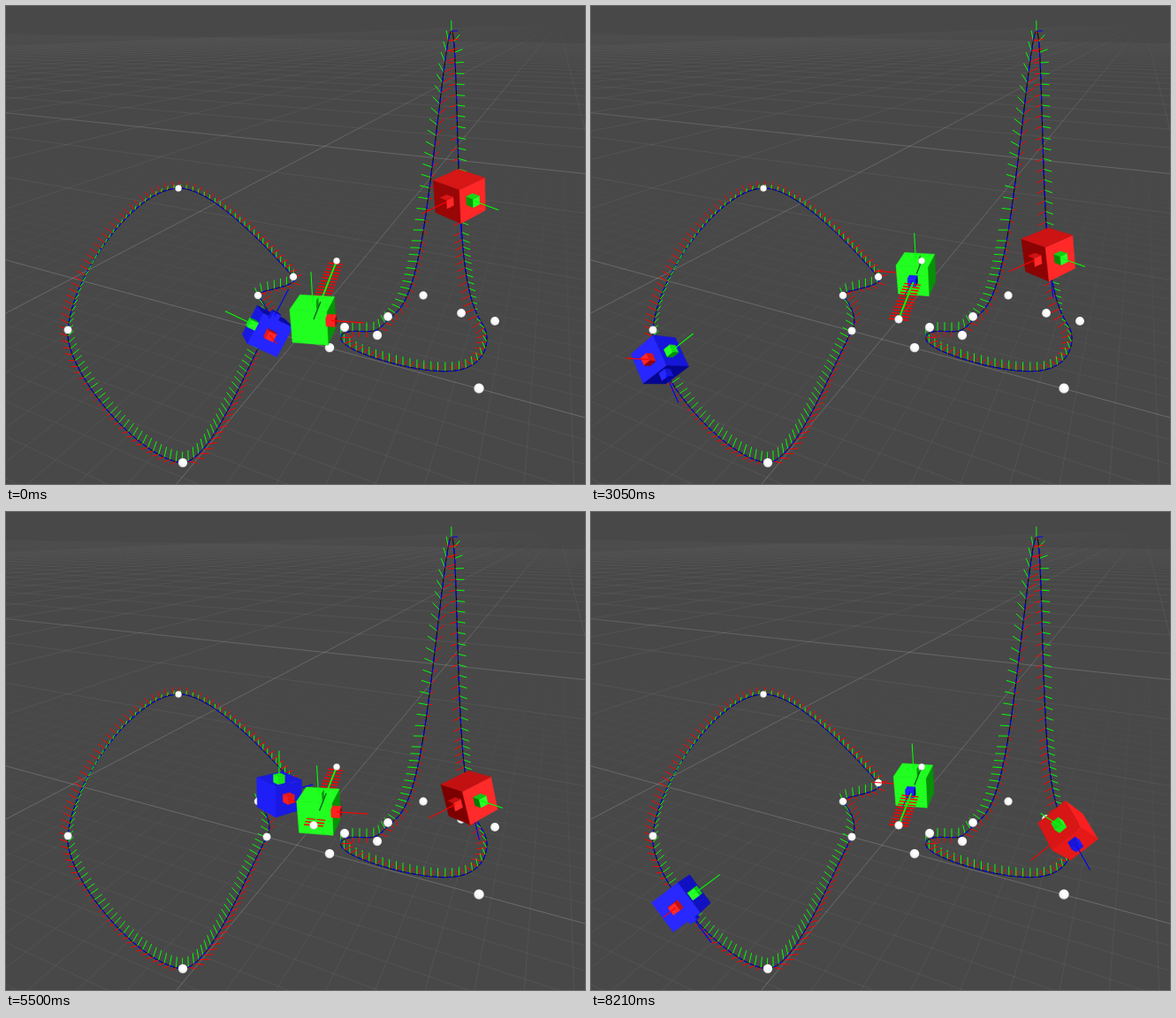
An HTML page with a canvas that plays this animation: 655 px wide and 540 px high, repeating every 8260 ms.

```html
<!DOCTYPE html>
<html lang="en">
<head>
<meta charset="utf-8">
<title>Cubes on splines</title>
<style>
html, body { margin: 0; width: 100%; height: 100%; overflow: hidden; background: #484848; }
canvas { display: block; }
</style>
</head>
<body>
<canvas id="stage" width="655" height="540"></canvas>
<script>
const W = 655, H = 540, LOOP = 8260, LAP = 4927;
const RED = '#f00', GREEN = '#0f0', BLUE = '#00f';
const view = document.getElementById('stage').getContext('2d');

// Vectors: x right, y down, z towards the viewer.
const dot = (a, b) => a[0] * b[0] + a[1] * b[1] + a[2] * b[2];
const mul = (a, k) => a.map(v => v * k);
const add = (a, b) => a.map((v, i) => v + b[i]);
const mix = (a, b, k) => a.map((v, i) => v + (b[i] - v) * k);
const unit = a => mul(a, 1 / Math.hypot(...a));
const cross = (a, b) => [
  a[1] * b[2] - a[2] * b[1],
  a[2] * b[0] - a[0] * b[2],
  a[0] * b[1] - a[1] * b[0]
];

// Left loop: Bezier pieces as node, handle, handle.
const knots = [
  [295, 367], [303, 352], [292, 336],
  [285, 327], [281, 321], [334, 318],
  [325, 306], [307, 286], [235, 204],
  [195, 206], [148, 206], [76, 300],
  [70, 366], [66, 412], [150, 512],
  [200, 516], [232, 512], [265, 425]
];
// Right loop: closed uniform B-spline.
const hull = [[511, -126], [509, 347], [553, 356], [535, 432], [366, 386],
  [383, 363], [420, 372], [432, 351], [472, 327]];

const blend = (pts, from, weights) => [0, 1].map(c =>
  weights.reduce((sum, w, j) => sum + w * pts[(from + j) % pts.length][c], 0));

function bezier(u) {
  const i = Math.floor(u), t = u - i, s = 1 - t;
  return blend(knots, i * 3, [s ** 3, 3 * s * s * t, 3 * s * t * t, t ** 3]);
}

function bspline(u) {
  const i = Math.floor(u), t = u - i, s = 1 - t;
  const bump = x => (3 * x ** 3 - 6 * x * x + 4) / 6;
  return blend(hull, i + hull.length - 1, [s ** 3 / 6, bump(t), bump(s), t ** 3 / 6]);
}

// A track leans by its key up vectors; the rest follows from its direction.
const loop = {
  path: bezier, count: 6, gap: () => 7.2, size: p => 12.2 + .018 * p[1],
  ups: [
    [0, [-.9, -.42, .3]],
    [1.5, [0, -.93, .35]],
    [2.7, [.04, -.53, .84]],
    [3.4, [.1, -.4, .9]],
    [4.4, [.75, -.52, .42]],
    [5, [.03, -.95, .3]],
    [6, [-.9, -.42, .3]]
  ]
};
const tower = {
  path: bspline, count: 9, gap: p => p[1] < 260 ? 12 : 8, size: () => 20.3,
  ups: [
    [0, [0, -1, .2]],
    [.3, [.8, 0, .6]],
    [.8, [.72, .27, .64]],
    [1.3, [.6, .2, .76]],
    [1.8, [-.5, -.3, .8]],
    [3, [0, -.85, .53]],
    [6, [0, -.85, .53]],
    [8, [-.95, 0, .35]],
    [9, [0, -1, .2]]
  ]
};

function frameAt(track, u) {
  const p = track.path(u), q = track.path(u + .002);
  const i = Math.max(1, track.ups.findIndex(k => k[0] >= u));
  const [a, b] = [track.ups[i - 1], track.ups[i]];
  const up = unit(mix(a[1], b[1], (u - a[0]) / (b[0] - a[0])));
  const dx = q[0] - p[0], dy = q[1] - p[1];
  const f = unit([dx, dy, -(dx * up[0] + dy * up[1]) / up[2]]);
  return { p, dir: unit([dx, dy]), h: track.size(p), u: up, f, r: cross(up, f) };
}

// Even speed between the moments at which the nodes are passed.
const passes = [0, 340, 780, 1800, 2880, 3890, LAP];
const STEPS = 80;
const lengths = passes.slice(1).map((_, i) => {
  const sums = [0];
  for (let j = 1; j <= STEPS; j++) {
    const a = bezier(i + (j - 1) / STEPS), b = bezier(i + j / STEPS);
    sums.push(sums[j - 1] + Math.hypot(b[0] - a[0], b[1] - a[1]));
  }
  return sums;
});
function loopPos(t) {
  const i = passes.findIndex(v => v > t) - 1, sums = lengths[i];
  const goal = sums[STEPS] * (t - passes[i]) / (passes[i + 1] - passes[i]);
  const j = Math.max(1, sums.findIndex(v => v >= goal));
  return i + (j - 1 + (goal - sums[j - 1]) / (sums[j] - sums[j - 1])) / STEPS;
}

function towerPos(t) {
  const s = t / 1000;
  return .8 + .08 * s + .021 * Math.max(0, s - 4) ** 2;
}

function line(g, a, b, color, width = 1) {
  g.strokeStyle = color;
  g.lineWidth = width;
  g.beginPath();
  g.moveTo(a[0], a[1]);
  g.lineTo(b[0], b[1]);
  g.stroke();
}

function fade(g, stops) {
  const grad = g.createLinearGradient(0, 0, 0, H);
  for (const [y, a] of stops) grad.addColorStop(y / H, `rgba(255,255,255,${a})`);
  return grad;
}

function drawGrid(g) {
  const strong = fade(g, [[20, 0], [60, .06], [150, .16], [540, .2]]);
  const weak = fade(g, [[20, 0], [50, .035], [140, .06], [540, .06]]);
  const faint = fade(g, [[150, 0], [300, .025], [540, .06]]);
  const rays = (from, start, step, count, major) => {
    for (let n = -40; n <= count; n++) {
      const ten = n % 10 === 0;
      if (!ten && n > 40) continue;
      const foot = [start + step * n, H];
      line(g, from, mix(from, foot, 1.2), n === 0 || n === major ? strong : ten ? weak : faint);
    }
  };
  rays([625, 20], 193, -56.2, 220, 10);
  rays([-997, 16], 931, 102.1, 300, 30);
}

function drawTrack(g, track) {
  g.strokeStyle = '#000';
  g.lineWidth = 1;
  g.beginPath();
  for (let i = 0; i < track.count * 60; i++) g.lineTo(...track.path(i / 60));
  g.closePath();
  g.stroke();
  let last = track.path(0), run = 0;
  for (let i = 1; i < track.count * 400; i++) {
    const p = track.path(i / 400), gap = track.gap(p);
    run += Math.hypot(p[0] - last[0], p[1] - last[1]);
    last = p;
    if (run < gap) continue;
    run -= gap;
    const a = frameAt(track, i / 400);
    line(g, p, add(p, mul(a.r, a.h * .6)), RED);
    line(g, p, add(p, mul(a.u, a.h * .6)), GREEN);
    line(g, p, add(p, mul(a.dir, gap * .6)), BLUE, 1.1);
  }
}

function ball(g, [x, y], r) {
  const grad = g.createRadialGradient(x + r * .2, y - r * .3, r * .3, x, y, r * 1.1);
  grad.addColorStop(0, '#fff');
  grad.addColorStop(.65, '#f4f4f4');
  grad.addColorStop(1, '#a5a5a5');
  g.fillStyle = grad;
  g.beginPath();
  g.arc(x, y, r, 0, Math.PI * 2);
  g.fill();
}

const EYE = 520;
const project = (c, v) => {
  const k = 1 / (1 - v[2] / EYE);
  return [c[0] + v[0] * k, c[1] + v[1] * k];
};

function shade(hue, d) {
  const lit = Math.max(0, d);
  const main = Math.min(255, Math.round(125 + 190 * lit)), rest = Math.round(46 * lit);
  return `rgb(${[0, 1, 2].map(i => i === hue ? main : rest)})`;
}

function box(a, mid, half, hue, light) {
  const dirs = [a.r, a.u, a.f];
  for (let i = 0; i < 3; i++) for (const s of [-1, 1]) {
    const n = mul(dirs[i], s), face = add(mid, mul(n, half));
    if (dot(n, [-face[0], -face[1], EYE - face[2]]) <= 0) continue;
    const p = mul(dirs[(i + 1) % 3], half), q = mul(dirs[(i + 2) % 3], half);
    view.fillStyle = view.strokeStyle = shade(hue, dot(n, light));
    view.lineWidth = .5;
    view.beginPath();
    for (const [j, k] of [[1, 1], [1, -1], [-1, -1], [-1, 1]])
      view.lineTo(...project(a.p, add(face, add(mul(p, j), mul(q, k)))));
    view.closePath();
    view.fill();
    view.stroke();
  }
}

function drawCube(a, hue, light) {
  const arms = [a.r, a.u, a.f].map((v, i) => ({ v, i, front: v[2] > 0 }));
  arms.sort((m, n) => m.v[2] - n.v[2]);
  const arm = ({ v, i, front }) => {
    const child = () => box(a, mul(v, a.h), a.h * .25, i, light);
    if (front) child();
    line(view, project(a.p, mul(v, front ? a.h : 0)), project(a.p, mul(v, a.h * 2.8)),
      [RED, GREEN, BLUE][i], 1.1);
    if (!front) child();
  };
  arms.filter(m => !m.front).forEach(arm);
  box(a, [0, 0, 0], a.h, hue, light);
  arms.filter(m => m.front).forEach(arm);
}

const railAt = k => mix([348, 354], [374, 288], k);
function drawRail(from, to) {
  for (let k = 0; k <= 1; k += .05) {
    if (k < from || k > to) continue;
    const p = railAt(k), r = 11 - 3 * k;
    line(view, add(p, [-r, -1]), add(p, [r, 1]), RED, 1.4);
  }
  line(view, railAt(from), railAt(to), GREEN, 2);
}

// The green cube goes there and back, turning round at both ends.
function drawShuttle(t) {
  const half = LAP / 2, back = t > half;
  const part = 1 - Math.abs(t - half) / half;
  const k = part * (1.1 - .1 * part), p = railAt(k);
  const u = unit([-.05, -.88, .45]), away = unit([.24, -.43, -.86]);
  const f = mul(away, back ? -1 : 1);
  drawRail(Math.min(1, k + .1), 1);
  drawCube({ p, h: 20.5 - 3.6 * k, u, f, r: cross(u, f) }, 1, [-.1, -.3, .95]);
  line(view, p, railAt(Math.min(1, k + .3)), '#064a20', 1.2);
  if (k > .14) drawRail(0, k - .14);
  if (k > .12) ball(view, railAt(0), 4.7);
  ball(view, railAt(1), 3.8);
}

// Everything that stands still is drawn once.
const still = document.createElement('canvas');
still.width = W;
still.height = H;
const back = still.getContext('2d');
back.fillStyle = '#484848';
back.fillRect(0, 0, W, H);
drawGrid(back);
drawTrack(back, loop);
drawTrack(back, tower);
for (let i = 0; i < 6; i++) ball(back, knots[i * 3], 2.8 + knots[i * 3][1] / 210);
for (const p of [[515, 347], ...hull.slice(2)]) ball(back, p, 1.5 + p[1] / 100);

function draw(t) {
  view.drawImage(still, 0, 0);
  drawCube(frameAt(tower, towerPos(t)), 0, [.5, -.15, .84]);
  drawCube(frameAt(loop, loopPos(t % LAP)), 2, [-.2, -.2, .95]);
  drawShuttle(t % LAP);
}

function tick(now) {
  draw(now % LOOP);
  requestAnimationFrame(tick);
}
draw(0);
requestAnimationFrame(tick);
</script>
</body>
</html>
```
